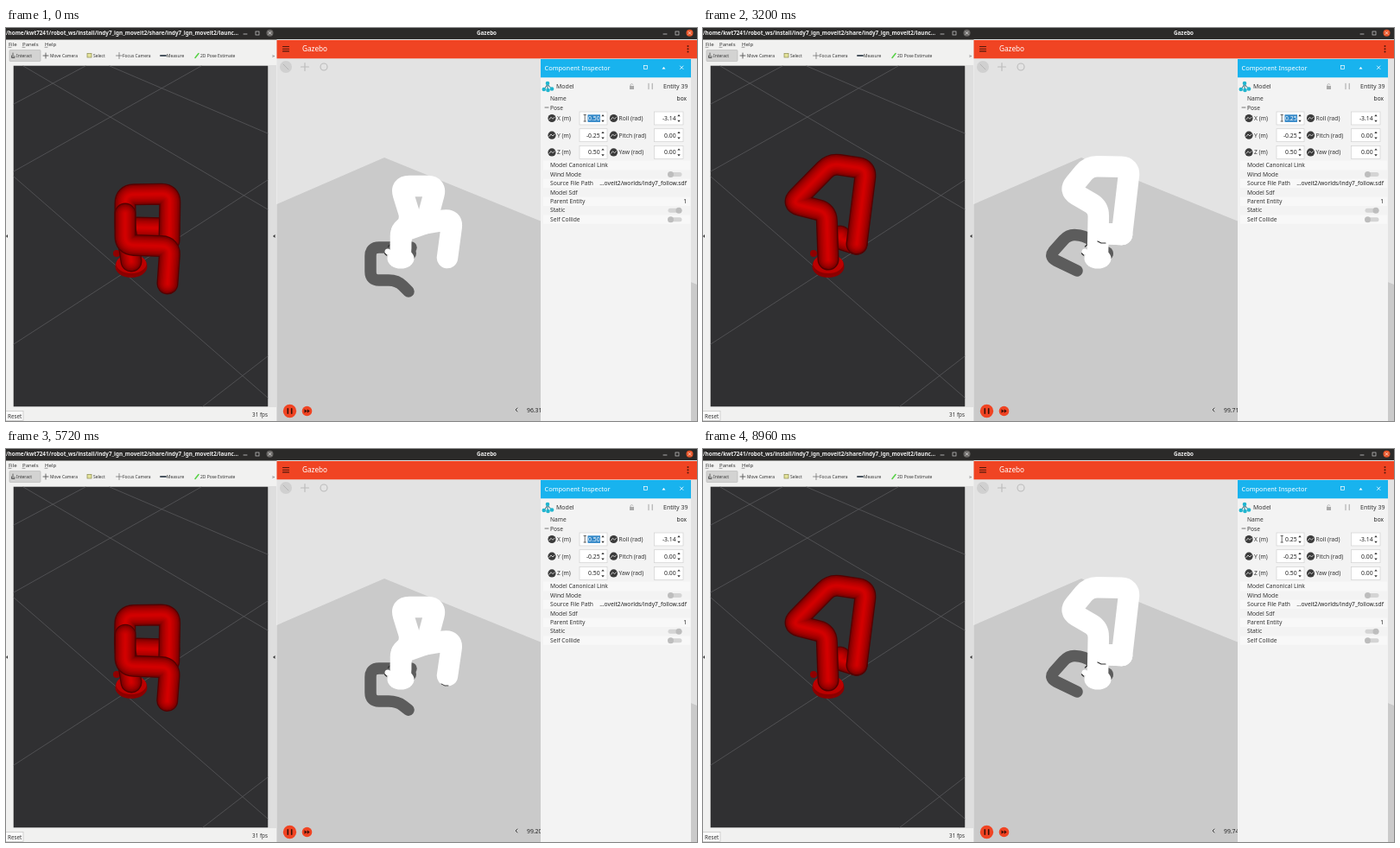
An HTML page for the animation above (9 s loop, 800 by 455 pixels).

```html
<!DOCTYPE html>
<html lang="en">
<head>
<meta charset="utf-8">
<title>Robot follow</title>
<style>
html, body { margin: 0; width: 100%; height: 100%; overflow: hidden; background: #f1f1f1; }
svg { display: block; width: 800px; height: 455px; }
text { font-family: "Noto Sans", "Open Sans", sans-serif; white-space: pre; }
path { stroke-linecap: round; stroke-linejoin: round; fill: none; }
</style>
</head>
<body>
<svg id="stage" viewBox="0 0 800 455" xmlns="http://www.w3.org/2000/svg"></svg>
<script>
const NS = 'http://www.w3.org/2000/svg';
const stage = document.getElementById('stage');
const END = { 'text-anchor': 'end' }, MID = { 'text-anchor': 'middle' };

function add(tag, attrs, parent = stage) {
  const el = document.createElementNS(NS, tag);
  for (const k in attrs) el.setAttribute(k, attrs[k]);
  return parent.appendChild(el);
}
const rect = (x, y, width, height, fill, more) => add('rect', { x, y, width, height, fill, ...more });
const disc = (cx, cy, r, fill, more) => add('circle', { cx, cy, r, fill, ...more });
const oval = (cx, cy, rx, ry, fill) => add('ellipse', { cx, cy, rx, ry, fill });
const line = (d, stroke, width = 1) => add('path', { d, stroke, 'stroke-width': width });
const shape = (d, fill) => add('path', { d, style: 'fill:' + fill });
const outline = (stroke, width = .7) => ({ stroke, 'stroke-width': width });
function text(x, y, s, size = 6.8, fill = '#333', more = {}) {
  const el = add('text', { x, y, 'font-size': size, fill, ...more });
  el.textContent = s;
  return el;
}

// ---- left window ----
rect(0, 0, 313, 455, '#f1f1f0');
rect(0, 0, 800, 13.5, '#2b2a29');
text(0, 8.2, '/home/kwt7241/robot_ws/install/indy7_ign_moveit2/share/indy7_ign_moveit2/launc...', 6.3, '#eee', { 'font-weight': 700 });
function windowButtons(x, closeColor) {
  line(`M${x - 2} 7h4`, '#ccc', .8);
  rect(x + 12, 4, 4, 4, 'none', outline('#ccc'));
  disc(x + 28.5, 5.8, 4, closeColor);
  line(`M${x + 27} 4.3l3 3m0 -3l-3 3`, '#fff', .7);
}
windowButtons(277, '#6a6866');
windowButtons(763, '#e8562a');
[[3, 'File'], [19, 'Panels'], [45, 'Help']].forEach(([x, s]) => {
  text(x, 21, s, 6);
  line(`M${x} 22.3h3`, '#444', .5);
});
rect(4, 25.5, 36, 13, '#d3d3d2', { ...outline('#bbb'), rx: 1 });
[[12, 'Interact'], [51, 'Move Camera'], [101, 'Select'], [135, 'Focus Camera'], [186, 'Measure'], [225, '2D Pose Estimate']]
  .forEach(([x, s]) => text(x, 33.7, s, 4.95));
line('M8 29v5m-1.5 -2v2.5h3.5v-2', '#555', .9);
line('M46 29v6m-3 -3h6', '#555', .9);
rect(94, 29.5, 5, 4.5, '#e4e39a', outline('#8a8a50'));
line('M131 28.5v7m-3.5 -3.5h7', '#666', .7);
line('M179 32h6', '#4a5560', 2);
line('M219 34.5l4 -5', '#55d144', 1.5);
text(308, 34, '»', 6, '#555');
rect(304, 43, 9, 396, '#dedede');
rect(8.7, 43.7, 294.6, 394.6, '#303032');
shape('M0 241l2 -2v4z', '#333');
shape('M309 241l2.5 -2v4z', '#333');
rect(-1, 443.5, 21, 11, '#fafafa', outline('#c4c4c4'));
text(2, 451.5, 'Reset', 6.3);
text(303, 450, '31 fps', 6.3, '#333', END);
line('M9 172L303 428M20 44L303 210M120 44L303 122M9 366L303 176M9 166L226 44M9 88L92 44M228 438L303 380', '#5e5e61', .7);

// ---- right window ----
text(556.5, 8.4, 'Gazebo', 6.3, '#eee', { ...MID, 'font-weight': 700 });
rect(313.5, 13, 486.5, 442, '#e3e3e3');
shape('M313.5 204L438 150L800 297V455H313.5z', '#cacaca');
rect(313.5, 14, 486.5, 21.3, '#f04423');
[0, 1, 2].forEach(i => {
  line(`M320.5 ${21.5 + 2.7 * i}h7`, '#53180c', 1.1);
  disc(789.5, 21 + 3.2 * i, 1, '#53180c');
});
text(343, 27.4, 'Gazebo', 8.2, '#fff');
disc(324, 45, 7, '#d0d0d0');
line('M321 42l6 6', '#b5b5b5');
line('M346 40.5v9m-4.5 -4.5h9', '#bcbcbc', 1.2);
disc(368, 45, 4, 'none', outline('#bcbcbc', 1.1));

// ---- robots ----
const mix = (a, b, p) => a + (b - a) * p;
const between = (a, b, p) => a.map((v, i) => mix(v, b[i], p));

// Polyline with every inner corner cut back and rounded.
function bend(points, cut = 10) {
  const toward = (a, b) => between(a, b, Math.min(.5, cut / (Math.hypot(b[0] - a[0], b[1] - a[1]) || 1)));
  return points.reduce((d, p, i) => {
    if (!i) return 'M' + p;
    const next = points[i + 1];
    return d + (next ? `L${toward(p, points[i - 1])}Q${p} ${toward(p, next)}` : 'L' + p);
  }, '');
}
// A tube is a stack of ever narrower and brighter strokes.
function tube(width, shades) {
  const g = add('g', {});
  const paths = shades.map((stroke, i) => add('path', { stroke, 'stroke-width': width * (1 - i / shades.length) }, g));
  return { g, set: d => paths.forEach(p => p.setAttribute('d', d)) };
}

// Joints of the far and the near reach; the last point of "front" is the tool.
const redJoints = {
  back: [[[189, 232], [152, 231]], [[178, 250], [158, 243]]],
  main: [[[145, 270], [142, 250], [138, 235], [138, 193], [190, 192], [189, 246]],
         [[145, 268], [143, 213], [103, 203], [148, 157], [189, 163], [178, 250]]],
  front: [[[138, 215], [138, 251], [190, 253], [187, 290]], [[159, 241], [158, 244], [176, 250], [178, 250]]]
};
const whiteJoints = {
  back: [[[486, 226], [458, 236]], [[485, 239], [465, 238]]],
  main: [[[457, 265], [457, 240], [469, 222], [457, 183], [498, 183], [487, 224]],
         [[457, 264], [458, 208], [424, 188], [447, 160], [494, 161], [485, 239]]],
  front: [[[457, 255], [457, 231], [517, 221], [511, 261]], [[464, 238], [464, 238], [484, 239], [485, 239]]]
};
const shade = [
  [[469, 254], [422, 254], [422, 292], [453, 292], [466, 301]],
  [[468, 262], [446, 242], [424, 238], [400, 265], [433, 281]]
];

function pose([far, near], p, drop = 0, swing = 0) {
  const last = far.length - 1, sway = swing * Math.sin(Math.PI * p);
  return bend(far.map((q, i) => {
    const [x, y] = between(q, near[i], p);
    return [x - (i ? sway : 0), y + (i === last ? drop * (1 - p) : 0)];
  }));
}
function robot(joints, width, shades) {
  const holder = add('g', {});
  const parts = {};
  for (const name in joints) holder.appendChild((parts[name] = tube(width, shades)).g);
  return (p, drop, swing) => {
    for (const name in parts) parts[name].set(pose(joints[name], p, name === 'front' ? drop : 0, swing));
    // The wrist passes behind the arm as it folds in.
    holder.appendChild(parts[p > .5 ? 'main' : 'front'].g);
  };
}

oval(145, 276, 18.5, 13, '#8c0000');
oval(145, 273, 17.5, 11, '#bc0000');
disc(128, 261, 4, '#900000');
const reds = Array.from({ length: 9 }, (_, i) => `rgb(${Math.round(84 + 126 * Math.sqrt(i / 8))},0,0)`);
const poseRed = robot(redJoints, 25, reds);

const shadow = line('', '#5c5c5c', 13.5);
disc(467, 261, 8, '#5c5c5c');
oval(457, 267, 15.5, 11.5, '#fff');
disc(442, 259, 3.5, '#fff');
line('M438.5 261l2 2m2 -10l2 -2', '#333', 1.3);
const poseWhite = robot(whiteJoints, 24.5, ['#fff']);
const footMark = line('M504 272l4 2h4', '#333');
const wristMark = line('M457 247l4 2h5', '#333', 1.2);

// ---- playback bar ----
disc(328.5, 443.5, 7.7, '#f04423');
line('M326.3 440.8v5.4m4.4 -5.4v5.4', '#3a1008', 1.6);
disc(348.5, 443.5, 5.8, '#f04423');
shape('M345.5 441.2l3 2.3l-3 2.3zM348.7 441.2l3 2.3l-3 2.3z', '#3a1008');
line('M592 440l-2 2l2 2', '#333', .9);
const rate = text(603, 444.6, '', 6.8, '#222');

// ---- inspector ----
rect(619, 36, 174, 419, '#f3f3f3');
rect(619, 36, 174, 21.3, '#18b3ee');
text(623.5, 48.8, 'Component Inspector', 7.4, '#fff');
rect(738.5, 43.5, 4, 4, 'none', outline('#fff'));
shape('M759.5 47.5l2 -2.5l2 2.5z', '#fff');
line('M780.5 44l3.5 3.5m0 -3.5l-3.5 3.5', '#fff', .8);
line('M627 65l-4 6m4 -6l5 6m-5 -6v7', '#2a6e80');
[[627, 64], [622.8, 71], [627.5, 72], [632, 70.5]].forEach(([x, y]) => disc(x, y, 2.3, '#21b5cf'));
text(637, 69.7, 'Model', 7);
text(789.5, 69.7, 'Entity 39', 7, '#333', END);
rect(722, 67, 5, 4, '#aaa');
line('M723 67v-1.5q1.5 -2 3 0', '#aaa', .8);
line('M744 64.5v6m4.3 -6v6', '#bbb', 1.4);
text(630, 84.2, 'Name', 6.6);
text(788, 84.2, 'box', 6.6, '#222', END);
line('M624 92h4', '#555', .8);
text(630, 94.5, 'Pose', 6.6);

// One labelled number box; returns its value.
function cell(x, y, label, boxX, width, number) {
  disc(x, y, 4.6, '#3b3b3b');
  line(`M${x - 3} ${y + 1.3}l2 -2.5l2 2l2 -2`, '#eee', .8);
  text(x + 6, y + 2.4, label, 6.7);
  rect(boxX, y - 7.5, width, 15, '#fff', outline('#d2d2d2'));
  const ax = boxX + width - 5;
  shape(`M${ax - 1.7} ${y - 2.3}l1.7 -2.2l1.7 2.2zM${ax - 1.7} ${y + 2.3}l1.7 2.2l1.7 -2.2z`, '#333');
  return text(ax - 3.4, y + 2.5, number, 6.8, '#222', END);
}
const [value] = ['X (m) ,Roll (rad),-3.14', 'Y (m),Pitch (rad),0.00,-0.25', 'Z (m),Yaw (rad),0.00,0.50'].map((row, i) => {
  const [left, right, b, a = ''] = row.split(','), y = 104.5 + i * 19.7;
  cell(703.5, y, right, 750.5, 33.5, b);
  return cell(632, y, left, 664, 32, a);
});
const picked = rect(673.5, 100.3, 14.5, 8.6, '#3388c8');
stage.appendChild(value);
line('M669 100.5h2.4m-1.2 0v7.5m-1.2 0h2.4', '#333', .7);

['Model Canonical Link', 'Wind Mode:off', 'Source File Path:...oveit2/worlds/indy7_follow.sdf', 'Model Sdf', 'Parent Entity:1', 'Static:on', 'Self Collide:off']
  .forEach((row, i) => {
    const [label, state] = row.split(':'), y = 158.8 + i * 10.45;
    if (i % 2 === 0) rect(622, y - 5, 170, 10.4, '#f8f8f8');
    text(630, y + 2.4, label, 6.7);
    if (state === 'on' || state === 'off') {
      rect(766.5, y - 2.2, 16, 5, '#d4d4d4', { rx: 2.5 });
      disc(state === 'on' ? 779 : 769.5, y + .3, 3.5, '#bdbdbd');
    } else if (state) text(788, y + 2.4, state, 6.7, '#222', END);
  });

// ---- motion ----
const LOOP = 9000, KEY = 200, ENTER = 1000;
const edits = [
  { start: 1720, entry: '0.25', near: 1, span: 500 },
  { start: 4330, entry: '0.50', near: 0, span: 480 },
  { start: 6200, entry: '0.25', near: 1, span: 900 }
];
const rates = [96.31, 99.57, 99.71, 99.5, 99.2, 99.6, 99.74];

const easeOut = u => 1 - (1 - Math.min(1, Math.max(0, u))) ** 3;
const fold = (t, slow) => edits.reduce((p, e) => mix(p, e.near, easeOut((t - e.start - ENTER) / (e.span * slow))), 0);

function showValue(t) {
  const edit = edits.filter(e => e.start <= t).pop();
  const age = edit ? t - edit.start : ENTER;
  const on = age >= ENTER && t < 8640;
  value.textContent = edit ? edit.entry.slice(0, 1 + Math.floor(age / KEY)) : '0.50';
  value.setAttribute('fill', on ? '#fff' : '#222');
  picked.style.opacity = on ? 1 : 0;
}
function draw(now) {
  const t = now % LOOP;
  const drop = Math.exp(-(t < 5330 ? t : t - 5100) / 500);
  const w = fold(t, .6);
  poseRed(fold(t, 1), 6 * drop, 10);
  poseWhite(w, 5 * drop, 0);
  shadow.setAttribute('d', pose(shade, w, 4 * drop));
  footMark.style.opacity = w < .02 && drop < .5 ? 1 : 0;
  wristMark.style.opacity = w > .98 ? 1 : 0;
  showValue(t);
  rate.textContent = rates[Math.floor(t / 1400)].toFixed(2);
}
const begin = performance.now();
function tick() {
  draw(performance.now() - begin);
  requestAnimationFrame(tick);
}
tick();
</script>
</body>
</html>
```
